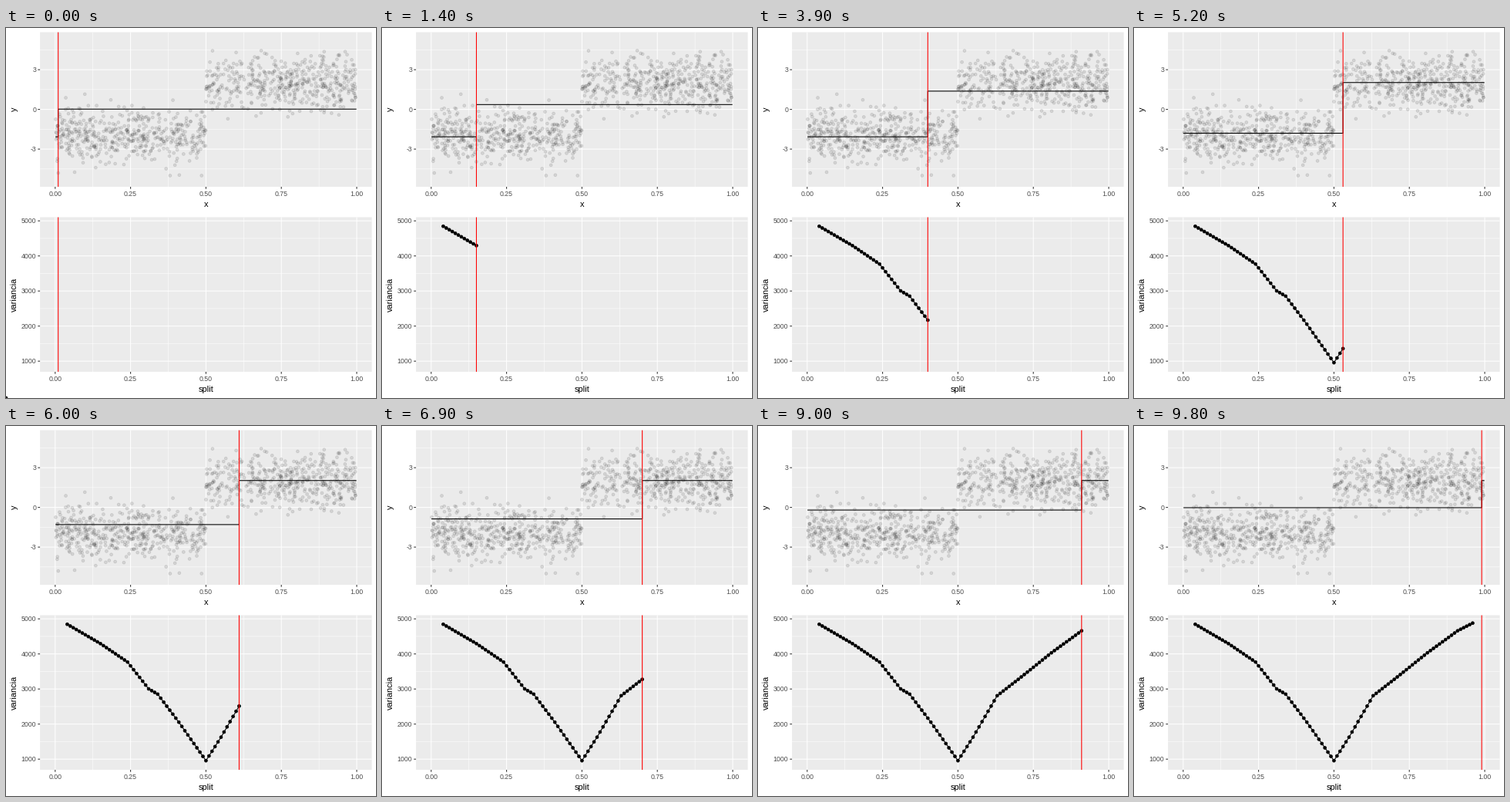
Animation, 480 px wide and 480 px high, one loop 9.9 s. Source, as a matplotlib script:

```python
import numpy as np
import matplotlib.pyplot as plt
from matplotlib.animation import FuncAnimation
from matplotlib.patches import Rectangle

plt.rcParams["font.family"] = "Liberation Sans"

SIZE = 480
LEFT, RIGHT = 44.1, 474.5
TOP = (5.5, 206.0)
BOTTOM = (245.5, 446.0)
LINE = 1.07
LOW, HIGH = -2.07, 2.03


def px(x):
    return 63.8 + 391.2 * np.asarray(x)


def py(y):
    return 105.6 - 17.17 * np.asarray(y)


def pv(v):
    return 250.2 + 0.0455 * (5000 - np.asarray(v))


fig = plt.figure(figsize=(SIZE / 72, SIZE / 72), dpi=72, facecolor="white")
ax = fig.add_axes([0, 0, 1, 1])
ax.set_xlim(0, SIZE)
ax.set_ylim(SIZE, 0)
ax.axis("off")


def stroke(xs, ys, color, width=LINE, z=1):
    line, = ax.plot(xs, ys, color=color, lw=width, zorder=z, snap=False,
                    solid_capstyle="butt", solid_joinstyle="round")
    return line


def points(xs, ys, alpha, z):
    # One colour per point keeps subpixel positions.
    colors = [(0, 0, 0, alpha)] * len(xs)
    return ax.scatter(xs, ys, s=3.91 ** 2, lw=0.71, zorder=z,
                      facecolors=colors, edgecolors=colors)


def label(x, y, text, size=8.8, color="#4D4D4D", ha="center", **kw):
    ax.text(x, y, text, fontsize=size, color=color, ha=ha, va="baseline", **kw)


def panel(span, to_y, majors, minors, x_title, y_title):
    top, bottom = span
    ax.add_patch(Rectangle((LEFT, top), RIGHT - LEFT, bottom - top,
                           fc="#EBEBEB", ec="none", snap=False, zorder=0))
    for x in np.arange(0.125, 1, 0.25):
        stroke([px(x)] * 2, span, "white", LINE / 2)
    for y in minors:
        stroke([LEFT, RIGHT], [to_y(y)] * 2, "white", LINE / 2)
    for y in majors:
        yy = to_y(y)
        stroke([LEFT, RIGHT], [yy] * 2, "white")
        stroke([LEFT - 2.75, LEFT], [yy] * 2, "#333333")
        label(39.1, yy + 3.2, str(y), ha="right")
    for x in np.arange(0, 1.25, 0.25):
        stroke([px(x)] * 2, span, "white")
        stroke([px(x)] * 2, [bottom, bottom + 2.75], "#333333")
        label(px(x), bottom + 12.4, f"{x:.2f}")
    label((LEFT + RIGHT) / 2, bottom + 26, x_title, 11, "black")
    label(14, (top + bottom) / 2, y_title, 11, "black", rotation=90,
          rotation_mode="anchor")


panel(TOP, py, range(-3, 4, 3), np.arange(-4.5, 5, 3), "x", "y")
panel(BOTTOM, pv, range(1000, 5001, 1000), range(1500, 5000, 1000),
      "split", "variancia")

# Two noisy levels that meet at the middle.
rng = np.random.default_rng(12)
xs = np.sort(rng.uniform(0, 1, 1000))
noise = np.clip(rng.normal(0, 1, 1000), -3, 3.15)
ys = np.where(xs < 0.5, -2, 2) + noise
points(px(xs), py(ys), 0.1, 2)

# Total variance bends through a few key splits (in percent).
key_splits = [4, 15, 24, 31, 34, 41, 50, 55, 63, 70, 81, 91, 96]
key_values = [4846, 4295, 3769, 3004, 2853, 2055, 957,
              1626, 2809, 3275, 4033, 4659, 4879]
percents = np.arange(4, 97)
curve_x = px(percents / 100)
curve_y = pv(np.interp(percents, key_splits, key_values))


def means(split):
    """Mean height on each side; the overall mean stays at zero."""
    if split <= 0.5:
        return LOW, -LOW * split / (1 - split)
    return -HIGH * (1 - split) / split, HIGH


step = stroke([], [], "black", z=3)
curve = stroke([], [], "black", z=3)
dots = points(curve_x, curve_y, 1, 4)
markers = [stroke([], [], "red", z=5) for _ in range(2)]


def draw(i):
    split = (i + 1) / 100
    x = float(px(split))
    left, right = py(means(split))
    step.set_data([px(0.001), x, x, px(0.999)], [left, left, right, right])
    shown = percents <= i + 1
    curve.set_data(curve_x[shown], curve_y[shown])
    dots.set_offsets(np.column_stack([curve_x[shown], curve_y[shown]]))
    for line, span in zip(markers, (TOP, BOTTOM)):
        line.set_data([x, x], span)
    return [step, curve, dots, *markers]


anim = FuncAnimation(fig, draw, frames=99, interval=100, repeat=True,
                     repeat_delay=0)
plt.show()
```
